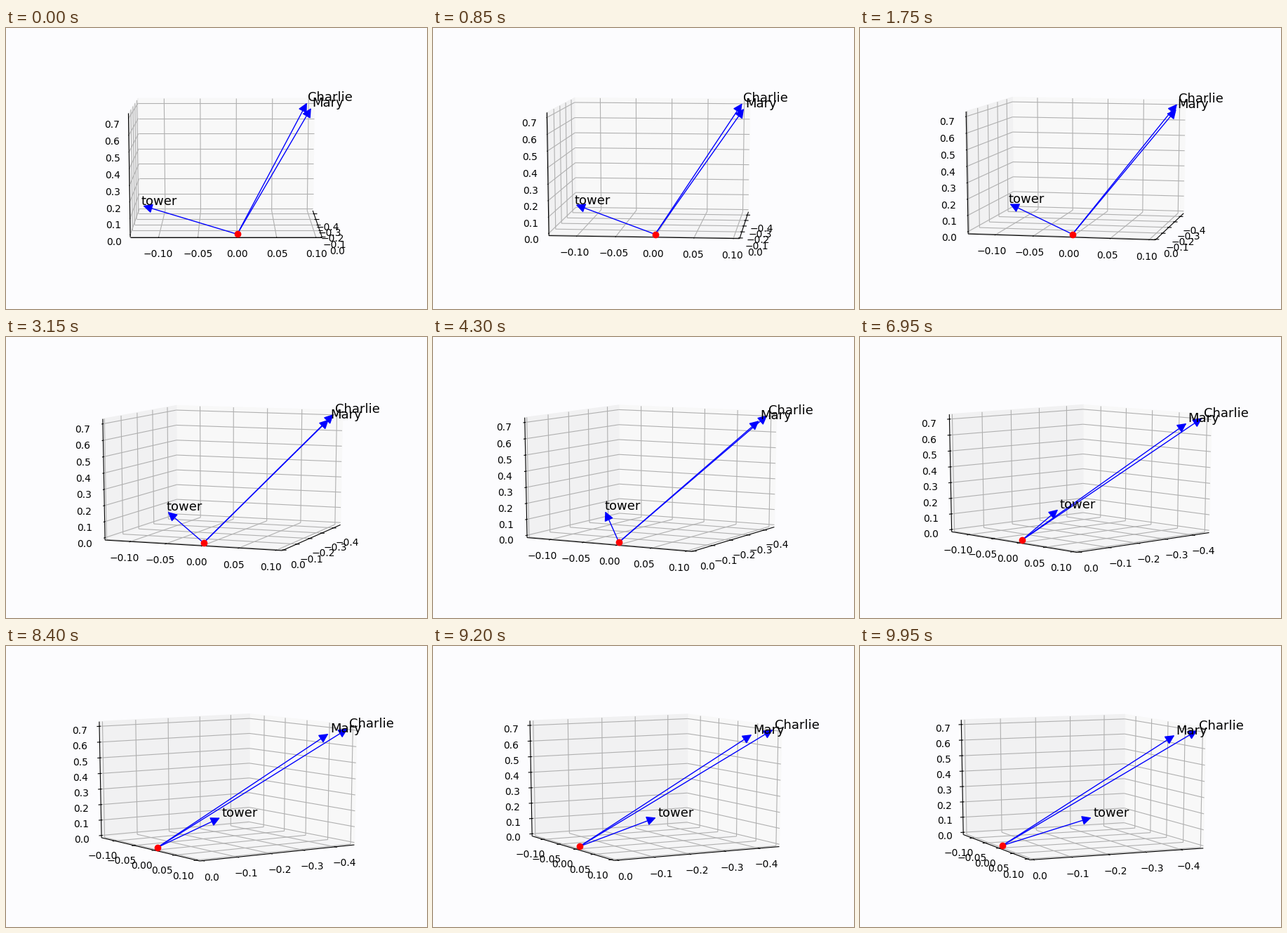
Recreate the animation shown at these times as a matplotlib script. Size 600x400 px, loop 10 s.

```python
import numpy as np
import matplotlib.pyplot as plt
from matplotlib.animation import FuncAnimation
from matplotlib.collections import LineCollection, PolyCollection
from matplotlib.patches import FancyArrowPatch

W, H, DPI = 600, 400, 100
FRAMES, INTERVAL = 200, 50
PAPER, GRID = "#fcfcfe", "#b0b0b0"
PANES = ["#f8f8f8", "#f1f1f2", "#f5f5f6"]

ELEV, DIST = np.radians(10), 10
# Plot area in pixels, and the view window it shows at distance 1
AREA_X, AREA_Y, AREA_W, AREA_H = 75, 50, 465, 302
WINDOW_LOW, WINDOW = 0.095, 0.185
SCALE = np.array([AREA_W, -AREA_H]) / WINDOW
CENTER = np.array([AREA_X, H - AREA_Y]) + WINDOW_LOW * SCALE

# Data limits of the three axes; the box spans -0.5..0.5 in each.
LIMITS = np.array([[-0.452, 0.0], [-0.1312, 0.1030], [0.0, 0.7148]])
STEP = 1 / 12
LO, HI = -0.5 - STEP / 4, 0.5 + STEP / 4

WORDS = {  # tips in box units
    "Charlie": (-0.5, 0.482, 0.5),
    "Mary": (-0.352, 0.5, 0.47),
    "tower": (-0.305, -0.5, -0.424),
}

# axis: ticks, label format, fixed edge position, direction of the tick marks
AXES = [
    (np.arange(-4, 1) * 0.1, "{:.1f}", (None, HI, LO), 1),
    (np.arange(-2, 3) * 0.05, "{:.2f}", (HI, None, LO), 0),
    (np.arange(0, 8) * 0.1, "{:.1f}", (HI, LO, None), 0),
]


def to_box(axis, value):
    low, high = LIMITS[axis]
    return (value - low) / (high - low) - 0.5


ORIGIN = [to_box(k, 0) for k in range(3)]


def project(points, azim):
    """Perspective view of box points, in pixels from the top left."""
    x, y, z = np.moveaxis(np.asarray(points, float), -1, 0)
    near = x * np.cos(azim) + y * np.sin(azim)
    side = y * np.cos(azim) - x * np.sin(azim)
    up = z * np.cos(ELEV) - near * np.sin(ELEV)
    depth = DIST - near * np.cos(ELEV) - z * np.sin(ELEV)
    return CENTER + SCALE * np.stack([side / depth, up / depth], axis=-1)


def with_value(point, axis, value):
    out = list(point)
    out[axis] = value
    return out


def build_box():
    panes, grid, edges, labels = [], [], [], []
    far = [LO, LO, LO]
    for k, (ticks, fmt, edge, tick_dir) in enumerate(AXES):
        a, b = (k + 1) % 3, (k + 2) % 3
        corner_a = with_value(far, a, HI)
        panes.append([far, corner_a, with_value(corner_a, b, HI),
                      with_value(far, b, HI)])
        edges.append([with_value(edge, k, LO), with_value(edge, k, HI)])
        for t in ticks:
            u = to_box(k, t)
            foot = with_value(far, k, u)
            grid.append([with_value(foot, a, HI), foot])
            grid.append([foot, with_value(foot, b, HI)])
            pos = with_value(edge, k, u)
            e = pos[tick_dir]
            edges.append([with_value(pos, tick_dir, e - 0.1 * STEP),
                          with_value(pos, tick_dir, e + 0.2 * STEP)])
            place = [c if i == k else c + np.copysign(STEP, c)
                     for i, c in enumerate(pos)]
            text = fmt.format(abs(t))
            labels.append((place, "\u2212" + text if t < -1e-9 else text))
    return panes, grid, edges, labels


panes, grid, edges, labels = build_box()
label_places = [place for place, _ in labels]
tips = list(WORDS.values())

plt.rcParams["font.family"] = "DejaVu Sans"
fig = plt.figure(figsize=(W / DPI, H / DPI), dpi=DPI, facecolor=PAPER)
ax = fig.add_axes([0, 0, 1, 1])
ax.set(xlim=(0, W), ylim=(H, 0))
ax.axis("off")

pane_art = PolyCollection([], facecolors=PANES, edgecolors=PANES, zorder=0)
grid_art = LineCollection([], colors=GRID, linewidths=0.8, zorder=1)
edge_art = LineCollection([], colors="black", linewidths=0.8, zorder=1.2)
for art in (pane_art, grid_art, edge_art):
    ax.add_collection(art, autolim=False)

tick_texts = [ax.text(0, 0, s, fontsize=10, ha="center", va="top", zorder=1.5)
              for _, s in labels]
word_texts = [ax.text(0, 0, s, fontsize=13, zorder=4) for s in WORDS]
arrows = [ax.add_patch(FancyArrowPatch((0, 0), (1, 1), arrowstyle="-|>",
                                       mutation_scale=20, lw=1, color="b",
                                       zorder=2))
          for _ in WORDS]
dot, = ax.plot([], [], "o", color="red", markersize=6, zorder=3)


def update(i):
    azim = np.radians(i / 3)
    pane_art.set_verts(project(panes, azim))
    grid_art.set_segments(project(grid, azim))
    edge_art.set_segments(project(edges, azim))
    for text, pos in zip(tick_texts, project(label_places, azim)):
        text.set_position(pos)
    start = project(ORIGIN, azim)
    for arrow, text, tip in zip(arrows, word_texts, project(tips, azim)):
        arrow.set_positions(start, tip)
        text.set_position(tip)
    dot.set_data([start[0]], [start[1]])
    return [pane_art, grid_art, edge_art, dot, *arrows, *tick_texts, *word_texts]


anim = FuncAnimation(fig, update, frames=FRAMES, interval=INTERVAL,
                     repeat=True, repeat_delay=0, blit=False)
plt.show()
```
